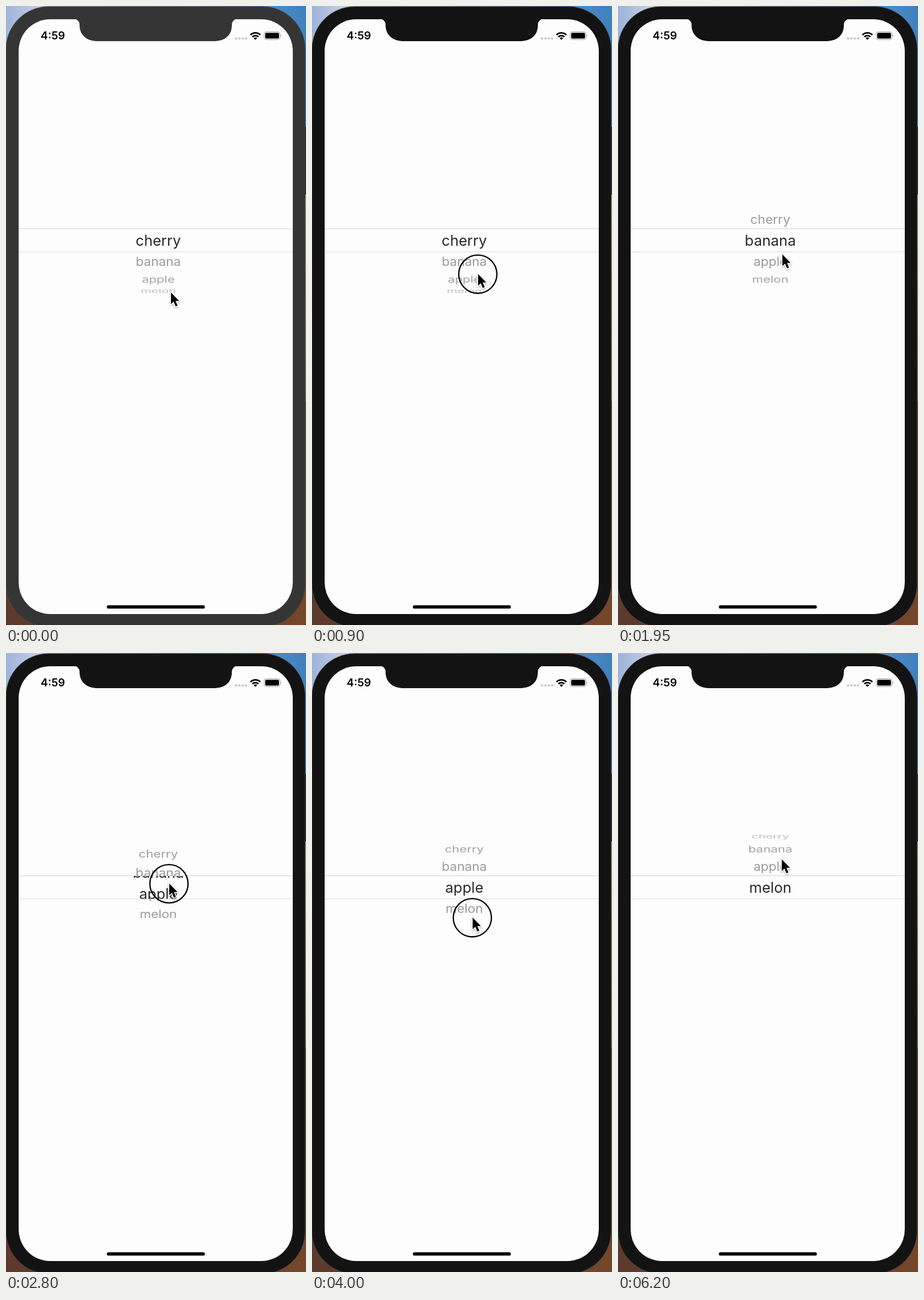
Recreate the animation shown at these times as an HTML page. Size 522 by 1074 pixels, loop 6.25 s.

```html
<!DOCTYPE html>
<html lang="en">
<head>
<meta charset="utf-8">
<title>Fruit picker</title>
<style>
  html, body { margin: 0; width: 100%; height: 100%; overflow: hidden; }
  svg { display: block; width: 100vw; height: 100vh; }
  text { font-family: Inter, "Liberation Sans", sans-serif; text-anchor: middle; }
</style>
</head>
<body>
<svg viewBox="0 0 522 1074" preserveAspectRatio="none">
  <defs>
    <linearGradient id="sky">
      <stop offset="0" stop-color="#9db4da"/>
      <stop offset=".1" stop-color="#c3cbe2"/>
      <stop offset=".9" stop-color="#4a8bc8"/>
      <stop offset="1" stop-color="#3f80bd"/>
    </linearGradient>
    <linearGradient id="ground">
      <stop offset="0" stop-color="#5c3a2c"/>
      <stop offset="1" stop-color="#74462a"/>
    </linearGradient>
    <linearGradient id="sand" x2="0" y2="1">
      <stop offset="0" stop-color="#b3a684"/>
      <stop offset="1" stop-color="#8f7650"/>
    </linearGradient>
    <clipPath id="inBand"><rect x="22" y="387" width="477" height="39.5"/></clipPath>
    <clipPath id="offBand"><path d="M22 100H499V387H22ZM22 426.5H499V800H22Z"/></clipPath>
    <filter id="shadow" x="-50%" y="-50%" width="200%" height="200%">
      <feDropShadow dx="0" dy="1.5" stdDeviation="1.5" flood-opacity=".35"/>
    </filter>
  </defs>

  <rect width="522" height="330" fill="url(#sky)"/>
  <rect y="327" width="522" height="358" fill="url(#sand)"/>
  <rect y="685" width="522" height="389" fill="url(#ground)"/>

  <g fill="#1d1d22">
    <rect x="519" y="210" width="3" height="117"/>
    <rect y="138" width="2" height="42"/>
    <rect y="210" width="2" height="75"/>
    <rect y="290" width="2" height="70"/>
  </g>
  <rect id="body" x="0" y="1" width="520.5" height="1076" rx="74" stroke="#45454a" stroke-width=".8"/>
  <rect x="22" y="23" width="477" height="1032" rx="55" fill="#fdfdfd"/>
  <path id="notch" d="M117 22Q128 23 128 33C128 51 141 61 160 61H361C381 61 393 51 393 33Q393 23 404 22Z"/>

  <text x="81.5" y="58" font-size="19" font-weight="600">4:59</text>
  <g fill="#c8c8c6">
    <circle cx="400.3" cy="56.3" r="2.1"/><circle cx="406.2" cy="56.3" r="2.1"/>
    <circle cx="412" cy="56.3" r="2.1"/><circle cx="417.8" cy="56.3" r="2.1"/>
  </g>
  <g fill="none" stroke="#000" stroke-width="2.7">
    <path d="M425.4 50.2A12.2 12.2 0 0 1 442.6 50.2"/>
    <path d="M428.7 53.5A7.5 7.5 0 0 1 439.3 53.5"/>
  </g>
  <path d="M434 58.8L430.9 55.7A4.4 4.4 0 0 1 437.1 55.7Z"/>
  <rect x="449.2" y="44.7" width="27.6" height="13.6" rx="3.8" fill="none" stroke="#999"/>
  <rect x="451" y="46.5" width="24" height="10" rx="2"/>
  <path d="M478 49.3Q480 51.5 478 53.7Z" fill="#999"/>
  <rect x="175.5" y="1039.8" width="170.5" height="5.8" rx="2.9"/>

  <rect x="22" y="386" width="477" height="1" fill="#d5d5d7"/>
  <rect x="22" y="426" width="477" height="1" fill="#e0dfd3"/>
  <g id="drum" clip-path="url(#offBand)" fill="#9a9a9a" font-size="25.5"></g>
  <g id="lens" clip-path="url(#inBand)" fill="#29282b" font-size="25.5"></g>

  <circle id="ring" r="33.2" fill="none" stroke="#000" stroke-width="2.3"/>
  <path id="cursor" d="M0 0V20.2L4.6 16L8.2 24.3L11.6 22.8L8.1 14.7H14.4Z" stroke="#fff"
        stroke-width="3" paint-order="stroke" stroke-linejoin="round" filter="url(#shadow)"/>
</svg>
<script>
const LOOP = 6250, STEP = 50;
const CENTER_X = 265, CENTER_Y = 406.75, BASELINE = 9.2;
const RADIUS = 96.6, ROW_ANGLE = 22 * Math.PI / 180, ROW_HEIGHT = 37.5;
const FRUITS = ["cherry", "banana", "apple", "melon"];

// Keys are [time, ...values], eased between neighbours.
const WHEEL = [[950, 0], [1650, 1], [2420, 1], [3017, 2], [4000, 2], [4580, 3]];
const POINTER = [
  [100, 287, 497], [750, 289, 465], [900, 289, 465], [1450, 286, 431], [2400, 286, 431],
  [2850, 284, 399], [3150, 284, 399], [3850, 279.5, 459], [4000, 279.5, 459],
  [4400, 286, 414], [4700, 286, 414], [5600, 285, 358]
];
const PRESSES = [[800, 1400], [2380, 2900], [3900, 4330]];
const FOCUS_TIME = 800;

const $ = id => document.getElementById(id);
const smooth = u => u * u * (3 - 2 * u);

function sample(keys, t) {
  const next = keys.findIndex(key => key[0] > t);
  if (next === 0) return keys[0].slice(1);
  if (next < 0) return keys[keys.length - 1].slice(1);
  const a = keys[next - 1], b = keys[next];
  const u = smooth((t - a[0]) / (b[0] - a[0]));
  return a.slice(1).map((v, i) => v + (b[i + 1] - v) * u);
}

function addLabels(parent) {
  return FRUITS.map(name => {
    const label = document.createElementNS("http://www.w3.org/2000/svg", "text");
    label.textContent = name;
    label.setAttribute("y", BASELINE);
    return parent.appendChild(label);
  });
}

const drumLabels = addLabels($("drum")), lensLabels = addLabels($("lens"));

function place(el, x, y, sx = 1, sy = 1) {
  el.setAttribute("transform", `translate(${x} ${y}) scale(${sx} ${sy})`);
}

function render(t) {
  const [position] = sample(WHEEL, t);
  FRUITS.forEach((_, i) => {
    const offset = i - position, angle = offset * ROW_ANGLE, depth = Math.cos(angle);
    place(drumLabels[i], CENTER_X, CENTER_Y + RADIUS * Math.sin(angle), .79 + .1 * depth, .89 * depth);
    drumLabels[i].setAttribute("opacity", Math.min(1, .3 + .85 * depth));
    place(lensLabels[i], CENTER_X, CENTER_Y + ROW_HEIGHT * offset);
  });

  const [x, y] = sample(POINTER, t);
  place($("cursor"), x, y);
  place($("ring"), x - .5, y + .3);
  const pressed = PRESSES.some(([down, up]) => t >= down && t < up);
  $("ring").setAttribute("visibility", pressed ? "visible" : "hidden");

  const shell = t < FOCUS_TIME ? "#353535" : "#131313";
  $("body").setAttribute("fill", shell);
  $("notch").setAttribute("fill", shell);
}

const start = performance.now();
function tick() {
  const t = (performance.now() - start) % LOOP;
  render(Math.floor(t / STEP) * STEP);
  requestAnimationFrame(tick);
}
tick();
</script>
</body>
</html>
```
